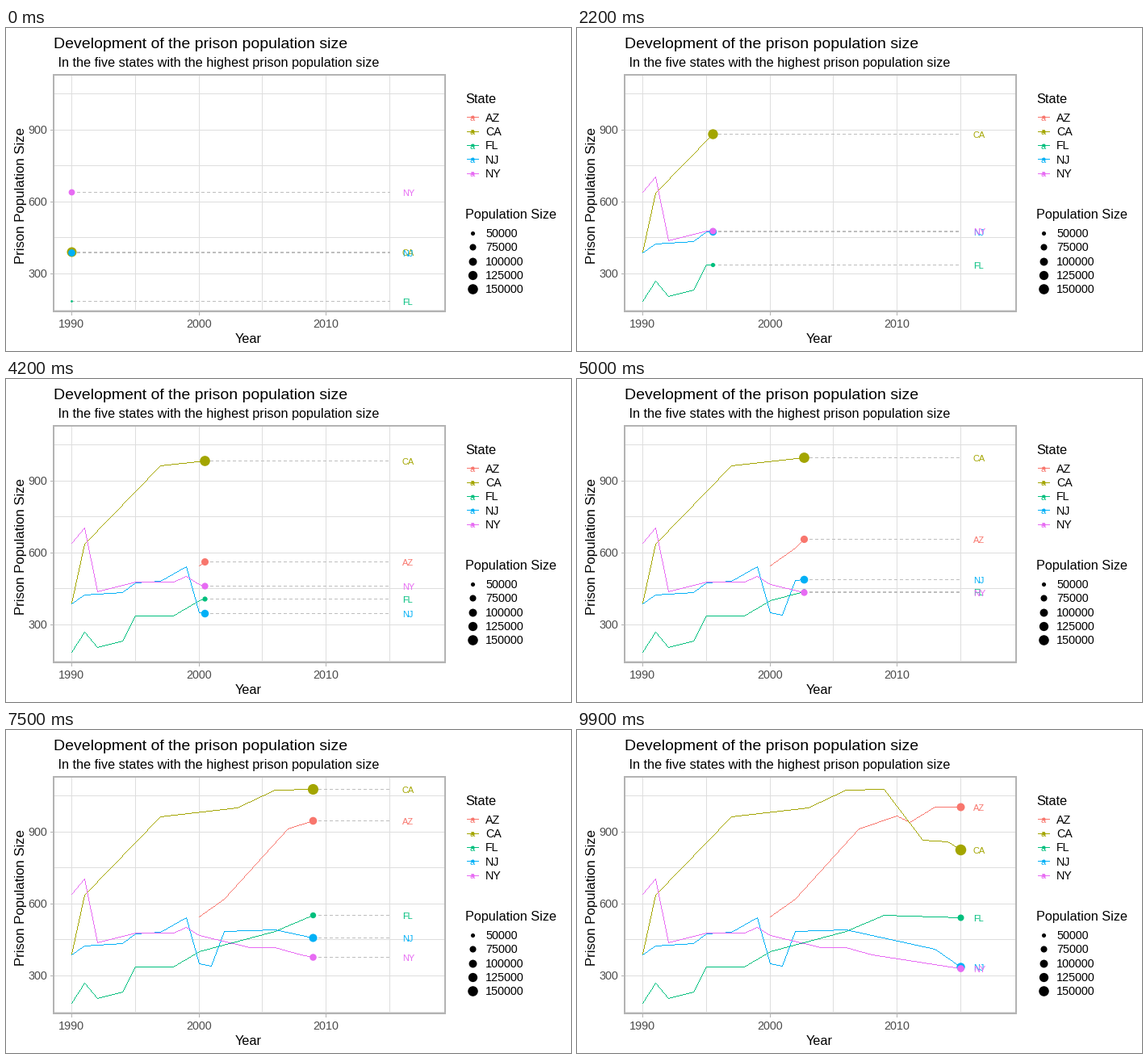
A matplotlib script that plays this animation: 700 px wide and 400 px high, repeating every 10 s.

```python
import numpy as np
import matplotlib.pyplot as plt
from matplotlib.animation import FuncAnimation
from matplotlib.patches import Rectangle
from matplotlib.path import Path

plt.rcParams["font.family"] = "Liberation Sans"

W, H, DPI = 700, 400, 100
FRAMES, INTERVAL = 100, 100
PT = 72 / DPI  # points per pixel
LEFT, RIGHT, TOP, BOTTOM = 59, 544, 58, 351
FIRST, LAST, SPAN = 1990, 2015, 25
PIXEL = Path([(0, 0), (1, 0), (1, -1), (0, -1), (0, 0)], closed=True)

# Turning points of each curve: years since 1990 -> rate
TURNS = {
    "AZ": {10: 546, 12: 620, 17: 912, 20: 966, 21: 941, 23: 1004},
    "CA": {0: 392, 1: 637, 7: 964, 13: 1000, 16: 1075, 19: 1078, 22: 865,
           24: 861, 25: 826},
    "FL": {0: 184, 1: 270, 2: 204, 4: 232, 5: 338, 8: 338, 10: 400, 16: 485,
           19: 553, 25: 541},
    "NJ": {0: 386, 1: 425, 4: 434, 5: 474, 7: 482, 9: 544, 10: 351, 11: 342,
           12: 487, 16: 492, 23: 411, 25: 337},
    "NY": {0: 640, 1: 704, 2: 438, 5: 480, 8: 480, 9: 502, 10: 468, 14: 418,
           16: 418, 18: 386, 25: 329},
}
COLORS = dict(zip(TURNS, ["#F8766D", "#A3A500", "#00BF7D", "#00B0F6", "#E76BF3"]))
# Position on the dot size scale in the first and last year
SHARES = {"AZ": (0.33, 0.45), "CA": (0.74, 1.0), "FL": (0.0, 0.236),
          "NJ": (0.31, 0.50), "NY": (0.215, 0.31)}


def px(year):
    return LEFT + (year - 1988.6) * 15.756


def py(rate):
    return 304 - (rate - 300) * 0.2967


def diameter(share):
    size = 1 + 5 * np.sqrt(share)
    return 2 * (1.067 * size + 0.354)


def trace(xs, ys):
    """Whole pixels along a polyline, one per step of the longer axis."""
    ends = np.round(np.column_stack([xs, ys]))
    steps = np.abs(np.diff(ends, axis=0)).max(axis=1).astype(int)
    runs = [np.linspace(a, b, n + 1) for a, b, n in zip(ends, ends[1:], steps)]
    return np.vstack([ends[:1], *runs]).round().T


def year_at(frame):
    """Whole years fall on whole frames, with linear motion in between."""
    years = np.arange(FIRST, LAST + 1)
    return np.interp(frame, np.round((years - FIRST) * (FRAMES - 1) / SPAN), years)


fig = plt.figure(figsize=(W / DPI, H / DPI), dpi=DPI, facecolor="white")
ax = fig.add_axes([0, 0, 1, 1])
ax.set_xlim(0, W)
ax.set_ylim(H, 0)
ax.axis("off")


def line(xs, ys, color, z, **kw):
    return ax.plot(xs, ys, color=color, lw=PT, zorder=z, antialiased=False,
                   solid_capstyle="butt", dash_capstyle="butt", **kw)[0]


def marks(xs, ys, size, color, z, marker="o"):
    return ax.plot(xs, ys, color=color, ls="", marker=marker, ms=size * PT, mew=0,
                   zorder=z)[0]


def text(x, y, s, size, color="black", **kw):
    return ax.text(x, y, s, fontsize=size * PT, color=color, zorder=6,
                   va="baseline", **kw)


def draw_panel():
    for year in range(FIRST, LAST + 1, 5):
        line([px(year)] * 2, [TOP, BOTTOM], "#DEDEDE", 1)
    for rate in range(150, 1051, 150):
        line([LEFT, RIGHT], [py(rate)] * 2, "#DEDEDE", 1)
    for year in (1990, 2000, 2010):
        line([px(year)] * 2, [BOTTOM, BOTTOM + 4], "#B3B3B3", 1)
        text(px(year), 371, str(year), 14.4, "#4D4D4D", ha="center")
    for rate in (300, 600, 900):
        line([LEFT - 4, LEFT], [py(rate)] * 2, "#B3B3B3", 1)
        text(51, py(rate) + 5, str(rate), 14.4, "#4D4D4D", ha="right")
    ax.add_patch(Rectangle((LEFT, TOP), RIGHT - LEFT, BOTTOM - TOP, fill=False,
                           ec="#B3B3B3", lw=2 * PT, zorder=5, antialiased=False))
    text(59, 25, "Development of the prison population size", 19.5)
    text(59.5, 48, " In the five states with the highest prison population size",
         16.3)
    text(300, 390, "Year", 16.3, ha="center")
    text(23, 207.5, "Prison Population Size", 16.8, rotation=90, ha="center",
         rotation_mode="anchor")


def draw_legends():
    text(569, 93, "State", 16.3)
    for i, (state, color) in enumerate(COLORS.items()):
        y = 110.4 + 17.28 * i
        line([571, 585], [y, y], color, 3)
        marks([578], [y], 4, color, 4)
        text(578, y + 4.6, "a", 11, color, ha="center")
        text(594, y + 5.3, state, 14.2)
    text(569, 236, "Population Size", 16.3)
    for i, count in enumerate(range(50000, 150001, 25000)):
        y = 254.2 + 17.28 * i
        marks([578], [y], diameter((count - 44000) / 129000), "black", 4)
        text(594, y + 5, str(count), 14.4)


class Series:
    def __init__(self, state, z):
        color = COLORS[state]
        self.years = FIRST + np.array(list(TURNS[state]))
        self.rates = np.array(list(TURNS[state].values()))
        self.shares = SHARES[state]
        self.path = marks([], [], 2, color, 2 + z, PIXEL)
        self.guide = line([], [], "#BEBEBE", 3 + z, linestyle=(0, (4, 4)))
        self.dot = marks([], [], 1, color, 4 + z)
        self.label = text(px(2016), 0, state, 11, color)

    def show(self, now):
        on = bool(now >= self.years[0])
        for art in (self.path, self.guide, self.dot, self.label):
            art.set_visible(on)
        if not on:
            return
        past = self.years < now
        x, y = px(now), py(np.interp(now, self.years, self.rates))
        self.path.set_data(*trace(np.append(px(self.years[past]), x),
                                  np.append(py(self.rates[past]), y)))
        self.guide.set_data([x, px(LAST)], [y, y])
        self.dot.set_data([x], [y])
        share = np.interp(now, [self.years[0], LAST], self.shares)
        self.dot.set_markersize(diameter(share) * PT)
        self.label.set_y(y + 5)


draw_panel()
draw_legends()
series = [Series(state, 0.1 * i) for i, state in enumerate(TURNS)]


def update(frame):
    now = year_at(frame)
    for s in series:
        s.show(now)
    return []


anim = FuncAnimation(fig, update, frames=FRAMES, interval=INTERVAL, repeat=True,
                     repeat_delay=0, blit=False)
plt.show()
```
